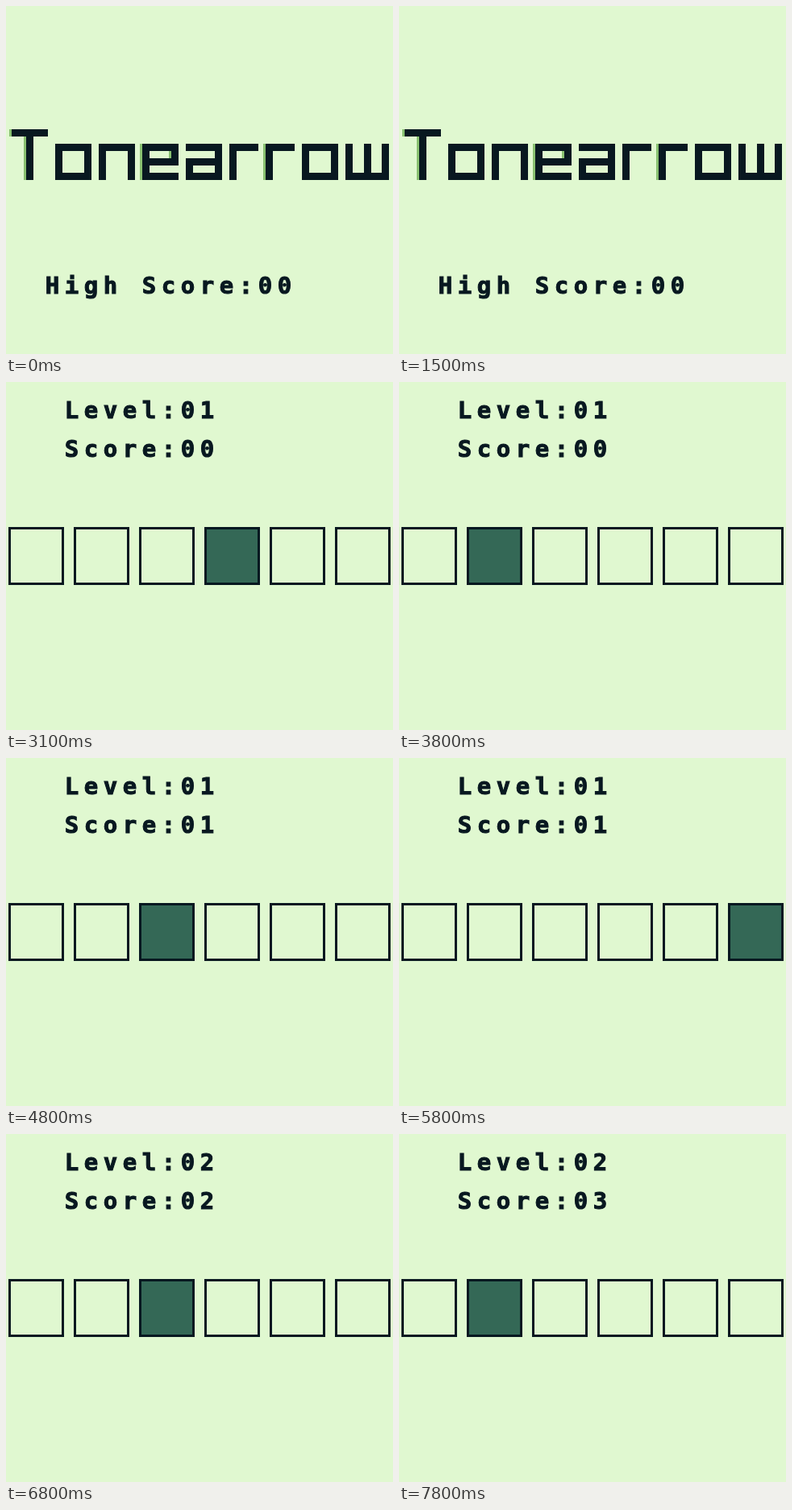
Animation, 480 px wide and 432 px high, one loop 8 s. Source, as an HTML page:

```html
<!DOCTYPE html>
<html lang="en">
<head>
<meta charset="utf-8">
<title>Tonearrow</title>
<style>
  html, body { margin: 0; width: 100%; height: 100%; overflow: hidden; background: #e0f8d0; }
  svg { display: block; width: 480px; height: 432px; }
  text { font: bold 29px "DejaVu Sans Mono", monospace; letter-spacing: 6.54px; fill: #081820; stroke: #081820; }
  #logo path { fill: none; stroke: #081820; stroke-width: .5; stroke-linecap: square; shape-rendering: crispEdges; }
  #logo .shade { stroke: #88c070; }
  #cells rect { fill: none; stroke: #081820; stroke-width: 3; shape-rendering: crispEdges; }
  #cells .lit { fill: #346856; }
</style>
</head>
<body>
<svg viewBox="0 0 480 432">
  <g id="intro">
    <g id="logo" role="img" aria-label="Tonearrow" transform="translate(11.5 175.5) scale(18)"></g>
    <text x="48.8" y="357">High Score:00</text>
  </g>
  <g id="game" visibility="hidden">
    <text id="level" x="72.8" y="45"></text>
    <text id="score" x="72.8" y="93"></text>
    <g id="cells"></g>
  </g>
</svg>
<script>
const LOOP = 8000;
const FRAME = 100;
const CELLS = 6;
const $ = id => document.getElementById(id);

function add(parent, tag, attrs) {
  const node = document.createElementNS("http://www.w3.org/2000/svg", tag);
  for (const key in attrs) node.setAttribute(key, attrs[key]);
  return parent.appendChild(node);
}

// Pen strokes of the title letters; a lowercase letter is two units high.
const strokes = {
  T: "M0-1H2M1-1V2",
  o: "M0 0H2V2H0Z",
  n: "M0 2V0H2V2",
  e: "M2 2H0V0H2V1H0",
  a: "M0 0H2V2H0V1H2",
  r: "M0 2V0H1.5",
  w: "M0 0V2H2.5V0M1.25 0V2"
};

let pen = 0;
[..."Tonearrow"].forEach((char, i) => {
  const stroke = (x, name) =>
    add($("logo"), "path", { d: strokes[char], class: name, transform: `translate(${x})` });
  if (i % 3 === 0) stroke(pen - 1 / 6, "shade");
  const width = stroke(pen, "ink").getBBox().width;
  pen += width + 1;
});

const cells = Array.from({ length: CELLS }, (_, i) =>
  add($("cells"), "rect", { x: 4.5 + 81 * i, y: 181.5, width: 66, height: 69 }));

// The beat speeds up slightly and lands on whole frames.
const beatStart = beat =>
  FRAME * Math.floor((2847.5 + 342 * beat - 0.8 * beat * beat) / FRAME);

function beatAt(time) {
  let beat = -1;
  while (beatStart(beat + 1) <= time) beat++;
  return beat;
}

// The lit cell runs back and forth; each turn scores, every second one raises the level.
const SWEEP = CELLS - 1;
const litCell = beat => SWEEP - Math.abs(SWEEP - (beat + CELLS) % (2 * SWEEP));
const twoDigits = n => String(Math.floor(n)).padStart(2, "0");
const show = (id, on) => $(id).setAttribute("visibility", on ? "visible" : "hidden");

function draw(time) {
  const beat = beatAt(time);
  show("intro", beat < 0);
  show("game", beat >= 0);
  if (beat < 0) return;
  cells.forEach((cell, i) => cell.classList.toggle("lit", i === litCell(beat)));
  $("level").textContent = "Level:" + twoDigits(1 + beat / (2 * SWEEP));
  $("score").textContent = "Score:" + twoDigits(beat / SWEEP);
}

function tick() {
  draw(performance.now() % LOOP);
  requestAnimationFrame(tick);
}
tick();
</script>
</body>
</html>
```
